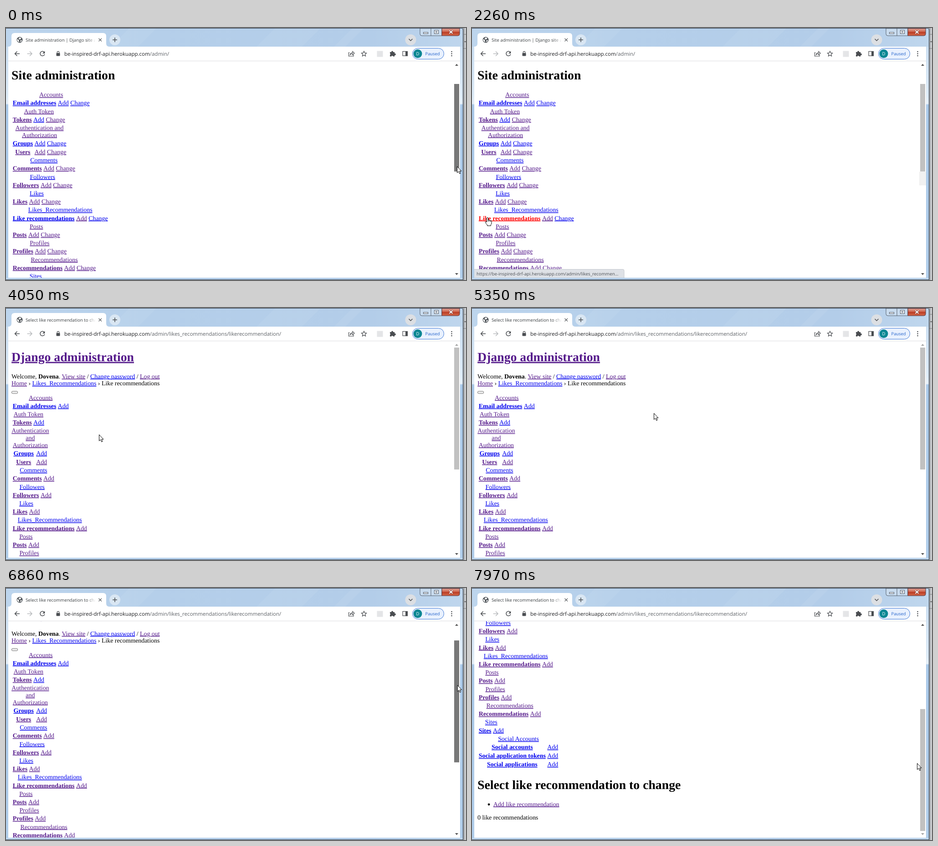
These frames come from a looping animation (1010 px wide and 554 px high, 8 s). An HTML page:

```html
<!DOCTYPE html>
<html lang="en">
<head>
<meta charset="utf-8">
<title>Site administration</title>
<style>
html, body { margin: 0; width: 100%; height: 100%; overflow: hidden; background: #b7d0ea; }
svg { display: block; width: 1010px; height: 554px; text-rendering: geometricPrecision; }
text { white-space: pre; }
.page { font: 13.87px "Liberation Serif", "Times New Roman", serif; fill: #000; }
.ui { font-family: "Open Sans", "Noto Sans", sans-serif; }
.h1 { font-size: 27.74px; font-weight: bold; }
.bold { font-weight: bold; }
.b { fill: #0000ee; text-decoration: underline; }
.v { fill: #551a8b; text-decoration: underline; }
.active { fill: #ff0000; }
.line { fill: none; stroke: #4a4d51; stroke-width: 1.5; }
.thin { stroke-width: 1.2; }
.dim { stroke: #b9bbbe; }
</style>
</head>
<body>
<svg viewBox="0 0 1010 554">
  <defs>
    <linearGradient id="glass">
      <stop offset="0" stop-color="#bdd5ed"/><stop offset=".3" stop-color="#b5cfea"/>
      <stop offset=".8" stop-color="#b3cde9"/><stop offset="1" stop-color="#bfd6ed"/>
    </linearGradient>
    <linearGradient id="side" x2="0" y2="1">
      <stop offset="0" stop-color="#c3d9ef"/><stop offset=".27" stop-color="#dceaf6"/>
      <stop offset=".3" stop-color="#e5eff8"/><stop offset=".305" stop-color="#a9c8e8"/>
      <stop offset="1" stop-color="#b0cdea"/>
    </linearGradient>
    <linearGradient id="edge">
      <stop offset="0" stop-color="#8c9096"/><stop offset="1" stop-color="#d6d8da"/>
    </linearGradient>
    <linearGradient id="red" x2="0" y2="1">
      <stop offset="0" stop-color="#e3a598"/><stop offset=".45" stop-color="#cf6650"/>
      <stop offset=".5" stop-color="#bb3a22"/><stop offset="1" stop-color="#d2694a"/>
    </linearGradient>
    <linearGradient id="fade">
      <stop offset="0" stop-color="#fff" stop-opacity="0"/><stop offset="1" stop-color="#fff"/>
    </linearGradient>
    <clipPath id="view"><path d="M5 73H997V549H5Z"/></clipPath>
    <clipPath id="tab"><path d="M43 14H196V38H43Z"/></clipPath>
  </defs>

  <!-- window frame -->
  <rect x="1003" width="7" height="554" fill="url(#edge)"/>
  <path d="M1004 45H1010M1005 14H1010" stroke="#777"/>
  <path d="M1006 29h4l-2 3z" fill="#555"/>
  <path d="M0 554V6Q0 0 6 0H997Q1003 0 1003 6V554Z" fill="url(#side)"/>
  <path d="M0 41V6Q0 1 6 1H997Q1003 1 1003 6V41Z" fill="url(#glass)"/>
  <g fill="#fff" opacity=".06">
    <path d="M270 1H330L290 41H230ZM590 1H690L650 41H550ZM760 1H785L745 41H720Z"/>
  </g>
  <rect y="549" width="1003" height="4" fill="url(#glass)"/>
  <path d="M0 .5H1001Q1003.5 1 1003.5 6V553.5H0" fill="none" stroke="#2b3440"/>

  <!-- window buttons -->
  <path d="M909 1H957V17H913Q909 17 909 13Z" fill="#c9dcef" stroke="#54606e"/>
  <path d="M957 1H996V13Q996 17 992 17H957Z" fill="url(#red)" stroke="#54303a"/>
  <path d="M933 1V17" stroke="#54606e"/>
  <rect x="916.5" y="9.5" width="10" height="3" fill="#fff" stroke="#4b5563"/>
  <rect x="940.5" y="5" width="9" height="7.5" fill="#fff" stroke="#4b5563"/>
  <rect x="943.5" y="7.5" width="3" height="2.5" fill="#c9dcef" stroke="#4b5563" stroke-width=".8"/>
  <path d="M973.5 5.5L980.5 12M980.5 5.5L973.5 12" stroke="#6b2a2a" stroke-width="3.4"/>
  <path d="M973.5 5.5L980.5 12M980.5 5.5L973.5 12" stroke="#fff" stroke-width="2"/>

  <!-- tab strip and toolbar -->
  <path d="M5 41Q12 41 12 34V18Q12 11 19 11H213Q220 11 220 18V34Q220 41 227 41Z" fill="#fff"/>
  <rect x="5" y="41" width="992" height="508" fill="#fff"/>
  <path d="M5 72.5H997" stroke="#dcdee1"/>
  <g class="ui">
    <g id="globe">
      <circle cx="30" cy="26" r="6.5" fill="#50555a"/>
      <path d="M25 24l3 2.5 1 4.5q-4-1-4.5-5zM29.5 20.8l4 1-1.5 3-3 .5-1.5-2zM32 27l3-.5-1.5 3.5-2.5 0z" fill="#fff"/>
    </g>
    <path id="spinner" d="M30 20A6 6 0 0 1 33 31.2" fill="none" stroke="#3f74e0" stroke-width="1.6"/>
    <text id="title" x="43" y="29.6" font-size="9.75" fill="#3c4043" clip-path="url(#tab)"></text>
    <rect x="178" y="16" width="19" height="20" fill="url(#fade)"/>
    <path class="line thin" d="M203.5 22.8L210 29.3M210 22.8L203.5 29.3"/>
    <circle cx="239" cy="26" r="12" fill="#d9e6f3"/>
    <path class="line" d="M234 26H244M239 21V31"/>
    <circle cx="888.5" cy="26" r="12" fill="#dcdfe3"/>
    <path class="line" d="M884.5 24L888.5 28L892.5 24"/>
    <path class="line" d="M30 56.5H19.5M24.5 51.5L19.5 56.5L24.5 61.5"/>
    <path class="line dim" d="M46.5 56.5H57M52 51.5L57 56.5L52 61.5"/>
    <g id="reload">
      <path class="line" d="M84 53.2A5 5 0 1 0 84.8 57.8"/>
      <path d="M85.3 50.8V56H80.1Z" fill="#4a4d51"/>
    </g>
    <path id="stop" class="line" d="M75.5 52L84.5 61M84.5 52L75.5 61"/>
    <rect id="hot" x="459" y="45" width="146" height="21" fill="#f0f1f3"/>
    <rect x="110.5" y="55" width="8" height="6.5" rx="1" fill="#4a4d51"/>
    <path class="line thin" d="M112.3 55.5V53.5A2.2 2.2 0 0 1 116.7 53.5V55.5"/>
    <text x="128" y="60.5" font-size="11.5" fill="#202124">be-inspired-drf-api.herokuapp.com<tspan id="path" fill="#5f6368"></tspan></text>
    <g class="line thin">
      <path d="M754.5 54H752.5V62H763V59M755.5 59Q756 54.5 761 54.3V51.5L765 55.5L761 59.2V56.5Q757.5 56.5 755.5 59Z"/>
      <path d="M786 51l1.6 3.7 4 .4-3 2.7.9 4-3.5-2.1-3.5 2.1.9-4-3-2.7 4-.4z"/>
      <rect x="871" y="51.5" width="10.5" height="9.5"/>
    </g>
    <rect x="877" y="51" width="5" height="10.5" fill="#4a4d51"/>
    <rect x="814.5" y="50.5" width="13" height="13" fill="#e4e5e7"/>
    <path d="M843 53h3.2a2 2 0 1 1 3.8 0H853.3V56a2 2 0 1 1 0 3.8V62.5H849.8a1.8 1.8 0 0 0-3.5 0H843V59a1.8 1.8 0 0 0 0-3.3Z" fill="#4a4d51"/>
    <rect x="892.5" y="44.5" width="69" height="24" rx="12" fill="#e9f1fe" stroke="#3d78d6"/>
    <circle cx="904" cy="56.5" r="9.5" fill="#0b8794"/>
    <text x="904" y="60" font-size="9.5" fill="#fff" text-anchor="middle">D</text>
    <text x="920.5" y="60" font-size="9.4" fill="#2464cc">Paused</text>
    <g fill="#4a4d51"><circle cx="978.5" cy="52" r="1.3"/><circle cx="978.5" cy="56.5" r="1.3"/><circle cx="978.5" cy="61" r="1.3"/></g>
  </g>

  <g clip-path="url(#view)">
    <g id="index" class="page"></g>
    <g id="list" class="page"></g>
    <rect id="track" x="982" y="316" width="15" height="30" fill="#f1f1f1"/>
    <rect id="thumb" x="984" width="11"/>
    <path id="up" d="M986 83H993L989.5 79Z"/>
    <path id="down" d="M986 539H993L989.5 543Z"/>
    <g id="status" class="ui">
      <path id="bubble" fill="#dee1e6" stroke="#c6c9ce"/>
      <text id="link" x="10" y="543.5" font-size="9.8" fill="#4d5156"></text>
    </g>
  </g>

  <g id="cursor" stroke="#000" fill="#fff" stroke-linejoin="round">
    <path id="arrow" d="M.5 .5V14.2L3.6 11.4L5.8 16.3L8 15.3L5.9 10.6H10Z"/>
    <path id="hand" d="M-1.5 1.5Q0-.8 1.5 1.5V6.5Q3 5 4 6.8Q5.8 5.6 6.6 7.5Q9 6.800 9 9.5V13Q8.5 15.5 7.3 16.5V18.8H-.5V17Q-3 14.5-5 10.8Q-4.5 8.3-2.5 10L-1.5 11ZM1.5 6.5V9.5M4 6.8V9.5M6.6 7.5V10"/>
    <path id="beam" d="M-3-7.5H-1L0-6.5L1-7.5H3M0-6.5V6.5M-3 7.5H-1L0 6.5L1 7.5H3" fill="none"/>
  </g>
</svg>
<script>
const $ = id => document.getElementById(id);
const SIZE = 13.87, UNIT = SIZE / 16, LEFT = 12.1, STEP = 21 * UNIT, LINE = 18 * UNIT;
const pen = document.createElement('canvas').getContext('2d');

function width(s, bold) {
  pen.font = (bold ? 'bold ' : '') + '100px "Liberation Serif", "Times New Roman", serif';
  return pen.measureText(s).width * SIZE / 100;
}

function add(parent, tag, attrs, text) {
  const node = document.createElementNS('http://www.w3.org/2000/svg', tag);
  for (const k in attrs) node.setAttribute(k, attrs[k]);
  if (text) node.textContent = text;
  return parent.appendChild(node);
}

const write = (page, x, y, s, cls = '', anchor = 'start') =>
  add(page, 'text', { x, y, class: cls, 'text-anchor': anchor }, s);

// A line of runs: [text, class]
function runs(page, y, parts) {
  const line = write(page, LEFT, y, '');
  for (const [s, cls] of parts) add(line, 'tspan', { class: cls || '' }, s);
}

// Caption lines, then rows with a centred heading and action links
function table(page, y, spec, actions) {
  const [head, ...rows] = spec.split('|').map(s => {
    const cut = s.lastIndexOf(' ');
    return { text: s.slice(0, cut), cls: s.slice(cut + 1) };
  });
  const lines = head.text.split(',');
  const cols = [Math.max(...rows.map(r => width(r.text, true))), ...actions.map(a => width(a))];
  const sum = cols.reduce((a, b) => a + b);
  const natural = sum + (4 * cols.length + 2) * UNIT;
  const full = Math.max(natural, ...lines.map(s => width(s)));
  const grow = 1 + (full - natural) / sum;
  lines.forEach((s, i) => write(page, LEFT + full / 2, y + i * LINE, s, head.cls, 'middle'));
  y += (lines.length - 1) * LINE + STEP;
  rows.forEach((r, i) => {
    let x = LEFT + 3 * UNIT;
    if (i) y += 22 * UNIT;
    const name = write(page, x + cols[0] * grow / 2, y, r.text, 'bold ' + r.cls[0], 'middle');
    if (r.text === 'Like recommendations') page.target = name;
    actions.forEach((a, j) => {
      x += cols[j] * grow + 4 * UNIT;
      write(page, x, y, a, r.cls[j + 1]);
    });
  });
  return y + STEP;
}

const models = [
  'Accounts v|Email addresses bbb',
  'Auth Token v|Tokens vbv',
  'Authentication and,Authorization v|Groups bbb|Users vvv',
  'Comments b|Comments vvv',
  'Followers b|Followers vvv',
  'Likes b|Likes vvv',
  'Likes_Recommendations b|Like recommendations bvb',
  'Posts v|Posts vvv',
  'Profiles v|Profiles vvv',
  'Recommendations v|Recommendations vvv',
  'Sites b|Sites bbb',
  'Social Accounts b|Social accounts bbb|Social application tokens bbb|Social applications bbb'
];

const index = $('index'), list = $('list');
write(index, LEFT, 112.5, 'Site administration', 'h1');
models.reduce((y, m) => table(index, y, m, ['Add', 'Change']), 151.2);

write(list, LEFT, 116.5, 'Django administration', 'h1 v');
runs(list, 154.5, [['Welcome, '], ['Dovena', 'bold'], ['. '], ['View site', 'v'], [' / '],
  ['Change password', 'b'], [' / '], ['Log out', 'v']]);
runs(list, 170.1, [['Home', 'v'], [' › '], ['Likes_Recommendations', 'b'], [' › Like recommendations']]);
add(list, 'rect', { x: 12.5, y: 183, width: 13, height: 5, rx: 2, fill: '#efefef', stroke: '#767676' });
models.reduce((y, m) => table(list, y,
  m.replace('tion and', 'tion,and').replace('bvb', 'vvv'), ['Add']), 201.6);
write(list, LEFT, 758.3, 'Select like recommendation to change', 'h1');
add(list, 'circle', { cx: 37, cy: 792.3, r: 2.4 });
write(list, 46.8, 796, 'Add like recommendation', 'v');
write(list, LEFT, 825.5, '0 like recommendations');

// Pointer moves: start, end, steps, target x, target y, ease power
const moves = [
  [240, 540, 5, 265, 392, 2], [740, 1460, 12, 34, 416, 3],
  [3660, 3780, 3, 203, 286, 2], [4050, 4490, 8, 214, 222, 1],
  [4860, 5040, 4, 262, 166, 2], [5290, 5470, 4, 444, 253, 2],
  [5660, 5830, 4, 813, 261, 2], [6020, 6560, 10, 988, 180, 3]
];
const drag = [[6740, 10], [6800, 50], [6870, 105], [6940, 150], [7010, 185], [7260, 219.5], [7320, 275], [7380, 316.5]];

function pointer(t, scroll) {
  if (t >= 7970) return [977, 385];
  if (t >= 7380) return [1020, 364];
  if (t >= 6740) return [988 + scroll * .055, 185 + scroll * .565];
  let x = 990, y = 304;
  for (const [from, to, n, tx, ty, power] of moves) {
    if (t < from) break;
    const k = Math.min(n, Math.floor((t - from) / (to - from) * (n - 1) + 1e-6) + 1) / n;
    const e = 1 - (1 - k) ** power;
    x += (tx - x) * e;
    y += (ty - y) * e;
  }
  return [Math.round(x), Math.round(y)];
}

const show = (id, on) => $(id).setAttribute('visibility', on ? 'visible' : 'hidden');
const set = (id, attrs) => { for (const k in attrs) $(id).setAttribute(k, attrs[k]); };
const say = (id, s) => { if ($(id).textContent !== s) $(id).textContent = s; };
const ADMIN = '/admin/', MODEL = 'likes_recommendations/likerecommendation/';

function draw(t) {
  const second = t >= 2990, loading = t >= 2440 && t < 3050, moved = t >= 2740;
  const scroll = drag.reduce((s, [at, v]) => t >= at ? v : s, 0);
  const [x, y] = pointer(t, scroll);

  show('index', !second);
  show('list', second);
  list.setAttribute('transform', `translate(0 ${-scroll})`);
  index.target.classList.toggle('active', t >= 2260 && t < 2440);

  say('title', moved ? 'Select like recommendation to change' : 'Site administration | Django site admin');
  say('path', ADMIN + (moved ? MODEL : ''));
  show('hot', moved && loading);
  show('globe', !loading);
  show('spinner', loading);
  show('reload', !loading);
  show('stop', loading);
  set('spinner', { transform: `rotate(${(t - 2850) * .36} 30 26)` });

  const held = second ? t >= 6740 && t < 7750 : t < 240;
  const over = second && t < 6740 && x >= 984;
  set('thumb', {
    y: second ? 87 + scroll * .566 : 123,
    height: second ? 268 : 192.5,
    fill: held ? '#787878' : over ? '#a8a8a8' : '#c1c1c1'
  });
  show('track', !second && t >= 240);
  set('up', { fill: second && !scroll ? '#a3a3a3' : '#505050' });
  set('down', { fill: scroll > 316 ? '#a3a3a3' : '#505050' });

  const wide = t >= 2440;
  show('status', t >= 1640 && t < 3050);
  set('status', { opacity: t < 1700 ? .5 : 1 });
  set('bubble', { d: `M4 530.5H${wide ? 454 : 331}q3 0 3 3V550H4Z` });
  say('link', 'https://be-inspired-drf-api.herokuapp.com' + ADMIN + (wide ? MODEL : 'likes_recommen…'));

  const hand = t >= 740 && t < 3660 && y > 410;
  const beam = t >= 4860 && t < 5290 && y < 174 && x > 210;
  show('hand', hand);
  show('beam', beam);
  show('arrow', !hand && !beam);
  set('cursor', { transform: `translate(${x} ${y})` });
}

const start = performance.now();
function tick() {
  draw((performance.now() - start) % 8000);
  requestAnimationFrame(tick);
}
tick();
</script>
</body>
</html>
```
